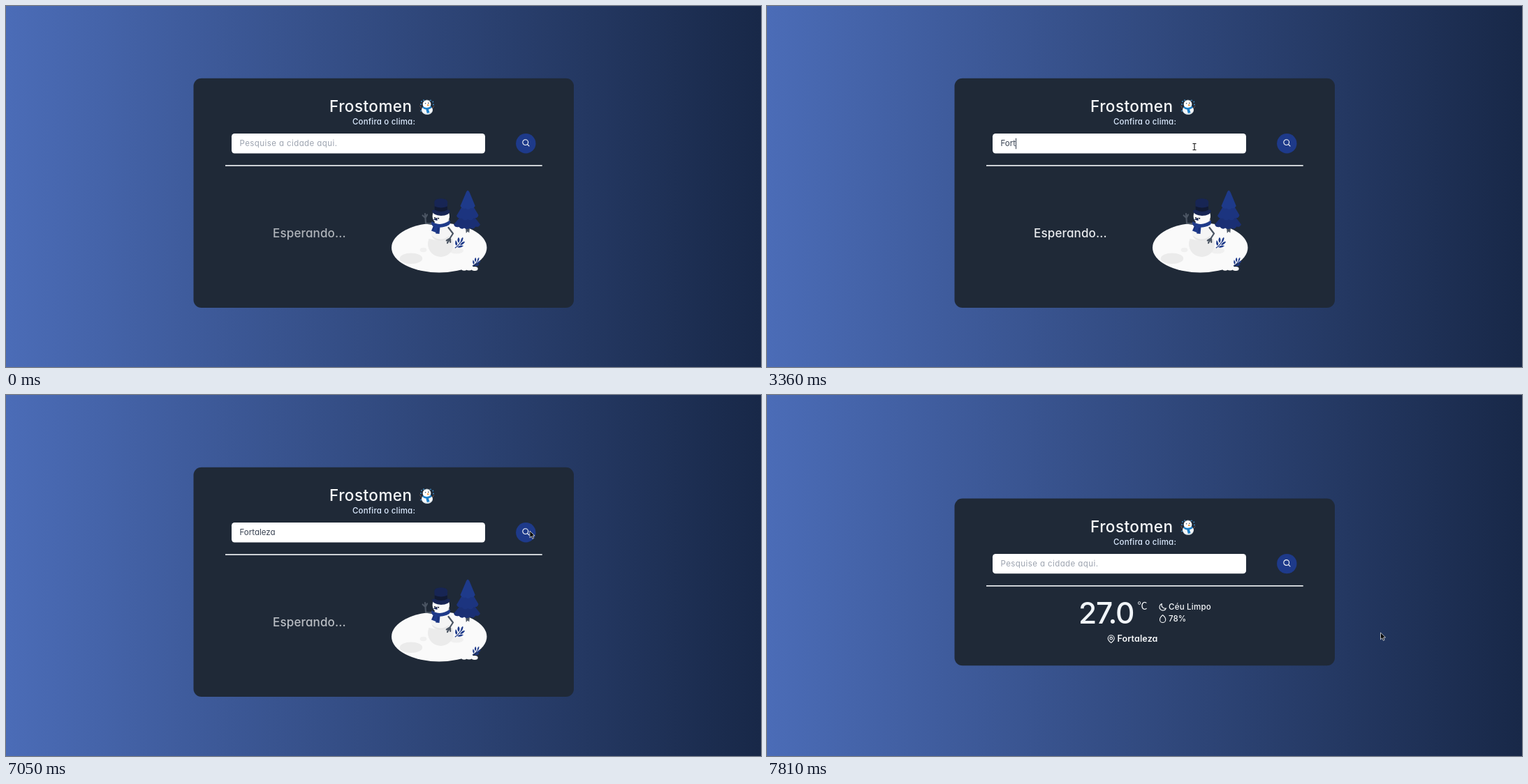
An HTML page for the animation above (8000 ms loop, 1081 by 518 pixels).

```html
<!DOCTYPE html>
<html lang="pt-BR">
<head>
<meta charset="utf-8">
<title>Clima</title>
<style>
  html, body { margin: 0; width: 100%; height: 100%; overflow: hidden; background: #31497f; }
  svg { display: block; width: 100vw; height: 100vh; }
  text { font: 500 11.5px Inter, "Open Sans", sans-serif; font-feature-settings: "cv11"; fill: #f8fafc; white-space: pre; }
  .title { font-size: 22.5px; letter-spacing: .02em; }
  .sub { letter-spacing: .016em; fill: #dbeafe; }
  .hint { font-weight: 400; letter-spacing: .036em; fill: #9ca3af; }
  .typed { font-weight: 400; fill: #374151; }
  .wait { font-size: 17px; letter-spacing: .008em; }
  .temp { font-size: 42.5px; letter-spacing: -.03em; fill: #f1f5f9; }
  .unit { font: 400 14px "Noto Sans CJK JP", "Noto Sans CJK SC", sans-serif; }
  .sky { letter-spacing: .02em; }
  .city { font-size: 12.5px; font-weight: 600; letter-spacing: .01em; }
  .line { fill: none; stroke: #f8fafc; stroke-width: 1.1; stroke-linecap: round; stroke-linejoin: round; }
  .twig { fill: none; stroke: #4b5563; stroke-width: 2.2; stroke-linecap: round; stroke-linejoin: round; }
</style>
</head>
<body>
<svg viewBox="0 0 1081 518" preserveAspectRatio="none">
  <defs>
    <linearGradient id="night"><stop stop-color="#4b6cb7"/><stop offset="1" stop-color="#182848"/></linearGradient>
    <g id="sprig" fill="#1e3a8a">
      <path d="M-6 7Q0 4 5-7" fill="none" stroke="#1e3a8a" stroke-width="1.2"/>
      <path d="M5-8Q1-5 3-1Q6-4 5-8ZM-1-8Q-4-4-1 0Q2-4-1-8ZM-5-4Q-7 1-4 4Q-1 1-5-4ZM8-2Q3-2 1 3Q6 3 8-2ZM6 4Q1 2-3 6Q2 8 6 4Z"/>
    </g>
  </defs>
  <rect width="1081" height="518" fill="url(#night)"/>
  <rect id="card" x="268.5" width="544.5" rx="11.3" fill="#1f2937"/>

  <g id="head">
    <text class="title" x="463" y="152">Frostomen</text>
    <g id="emoji">
      <path d="M595 147L592.5 143M610.5 147L613 143.5" stroke="#7c5446" stroke-width="1" fill="none"/>
      <ellipse cx="603" cy="149.2" rx="8" ry="6.4" fill="#f5f7f9"/>
      <path d="M596 152Q603 157.5 610.5 151Q609 155.7 603 155.7Q597.5 155.7 596 152Z" fill="#cfd8dc"/>
      <circle cx="602.5" cy="141" r="5.9" fill="#fff"/>
      <path d="M597 144Q603 148 608.8 143.5L609.5 146Q607 148 605 148.4L606.5 153L602.8 154L601.4 148.5Q598 148 596.4 146Z" fill="#1c7fc7"/>
      <path d="M603 141.2L607 142L603.2 143.2Z" fill="#f57c00"/>
      <g fill="#37474f"><circle cx="600.6" cy="139.8" r=".8"/><circle cx="604.8" cy="139.4" r=".8"/></g>
      <path d="M598.5 136.5Q602.5 133.5 607 136.2" stroke="#b0bec5" stroke-width=".8" fill="none"/>
      <g id="flakes" fill="#3d8fc9"></g>
    </g>
    <text class="sub" x="541" y="170" text-anchor="middle">Confira o clima:</text>
    <rect x="323" y="183" width="363" height="28.4" rx="4.3" fill="#fff"/>
    <text id="hint" class="hint" x="334.5" y="201.2">Pesquise a cidade aqui.</text>
    <text id="typed" class="typed" x="334.5" y="201.2"></text>
    <rect id="caret" y="189.7" width="1" height="15.5" fill="#374151"/>
    <circle cx="744.3" cy="197.2" r="14.2" fill="#1e3a8a"/>
    <path class="line" d="M747.6 195.6a3.9 3.9 0 1 1-7.8 0a3.9 3.9 0 1 1 7.8 0M746.6 198.6L749 201"/>
    <rect x="314" y="228.2" width="453.7" height="1.6" fill="#f8fafc"/>
  </g>

  <g id="waiting">
    <text id="wait" class="wait" x="434.5" y="332" text-anchor="middle">Esperando...</text>
    <ellipse cx="620.2" cy="346.7" rx="68.2" ry="35.8" fill="#fafafa"/>
    <ellipse cx="580" cy="362.3" rx="16.2" ry="7.7" fill="#ebebeb"/>
    <ellipse cx="597.5" cy="350" rx="4.8" ry="3.2" fill="#f0f0f0"/>
    <path d="M657.8 316H664.2L663.2 325.5L661 323.5L658.8 326Z" fill="#4b5563"/>
    <path d="M661 290L679 313.5Q677 318 672.5 316.5Q669 321.5 664.5 318.5Q660 322 656 318.5Q652 321.5 648.5 317Q643 318.5 641 313.5Z" fill="#1a2f74"/>
    <path d="M661 274L676.5 300Q675 305.5 670 304Q666 309.5 661.5 306Q656.5 309.5 652.5 304.5Q647.5 306 645 301Z" fill="#1c347f"/>
    <path d="M661 264.5Q663 265 664 268L671.8 287Q669 291.5 665.5 290Q661.5 293.5 658 290.5Q653 291.5 650.5 287L658.5 268Q659.5 265 661 264.5Z" fill="#1e3a8a"/>
    <ellipse cx="645" cy="351" rx="10" ry="4.5" fill="#f0f0f0"/>
    <circle cx="622.5" cy="341.5" r="18.5" fill="#ebebeb"/>
    <path d="M604 333.5Q622 339 641 333L637 324H608Z" fill="#fafafa"/>
    <circle cx="622.5" cy="322.5" r="14.8" fill="#f5f5f5"/>
    <path d="M609 329Q622 340 636 329Q631 337.3 622.5 337.3Q613 337 609 329Z" fill="#e6e6e6"/>
    <circle cx="622.8" cy="301.5" r="12.2" fill="#fafafa"/>
    <path d="M613 310Q623 318 635 306Q634.5 313.5 623 314Z" fill="#e8e8e8"/>
    <path class="twig" d="M612 313.5L601 311.5L600 298M600.4 304L596.6 300.5M600.5 304L603 299.5"/>
    <path class="twig" d="M633.5 318L640 326.5L634.5 335M635.5 333.5L630.8 336.5M635 334.5L632 340M636 334L636.2 339"/>
    <path d="M609.5 309Q622 317.5 635.5 307.5Q637 311.5 634.5 314Q624 320 612 316.5Q608 313.5 609.5 309Z" fill="#1e3a8a"/>
    <path d="M612.5 314L619.5 316.5L615.5 325L609 322.5ZM616 316L621.5 317L620.5 327L615.2 326.6Z" fill="#1e3a8a"/>
    <path d="M613 316.5L610.8 322M618.8 318L617.8 326" stroke="#142663" stroke-width=".8"/>
    <path d="M617.5 303.5L611.5 306.5L617.5 308Z" fill="#172554"/>
    <g fill="#111827"><circle cx="614" cy="304" r="1"/><circle cx="619.2" cy="304.8" r="1"/></g>
    <path d="M613.3 281Q614 276.5 622.8 276.2Q631.5 276.5 632.2 281L631.7 297H614Z" fill="#172554"/>
    <path d="M613.7 287.5Q623 291.5 632 287.5L631.7 296H614Z" fill="#111a33"/>
    <path d="M609.8 293.5Q612.5 292 614 292.5Q623 297.5 632 292.5Q635 291.8 636 294Q634.5 301 622.8 301Q611.5 300.5 609.8 293.5Z" fill="#172554"/>
    <use href="#sprig" transform="translate(649 340) scale(1.02)"/>
    <g fill="#fafafa"><ellipse cx="656" cy="376.5" rx="4.2" ry="3.2"/><ellipse cx="663" cy="375" rx="6" ry="4.5"/><ellipse cx="671" cy="377" rx="4.7" ry="3"/></g>
    <use href="#sprig" transform="translate(673 367.5) scale(.83)"/>
  </g>

  <g id="bones" fill="#94a3b8">
    <rect x="297" y="303.3" width="241" height="45.3"/>
    <rect x="573.5" y="306.2" width="181" height="17"/>
    <rect x="573.5" y="328.8" width="181" height="17"/>
  </g>

  <g id="result">
    <text class="temp" x="446" y="328.3">27.0</text>
    <text class="unit" x="530.5" y="307">℃</text>
    <path class="line" d="M565.3 299.6A4.9 4.9 0 1 0 571.4 306A4.9 4.9 0 0 1 565.3 299.6Z"/>
    <text class="sky" x="575" y="308.4">Céu Limpo</text>
    <path class="line" d="M566.6 315.8Q570.7 319 570.7 322.4A4.1 4.1 0 0 1 562.5 322.4Q562.5 319 566.6 315.8Z"/>
    <text x="575" y="325.4">78%</text>
    <path class="line" d="M492.7 355.6Q488.2 352 488.2 349.2A4.5 4.5 0 0 1 497.2 349.2Q497.2 352 492.7 355.6ZM494.5 349.2a1.8 1.8 0 1 1-3.6 0a1.8 1.8 0 1 1 3.6 0"/>
    <text class="city" x="501.5" y="354.4">Fortaleza</text>
  </g>

  <g id="mouse">
    <path id="arrow" d="M0 0V9.8L2.3 7.7L3.9 11.3L5.6 10.5L4 7H7.1Z" fill="#000" stroke="#e5e7eb" stroke-width=".8"/>
    <path id="beam" d="M-2.5-4.5H-.6L0-4L.6-4.5H2.5M0-4V4M-2.5 4.5H-.6L0 4L.6 4.5H2.5" fill="none" stroke="#111" stroke-width="1.1"/>
  </g>
</svg>
<script>
const LOOP = 8000, LOADING = 7120, DONE = 7810, BLUR = 6700, FOCUS = 1000;
const CITY = "Fortaleza";
const keyTimes = [2200, 2680, 3000, 3300, 3480, 3900, 4250, 4600, 4900];
// time, x, y of the pointer tip
const track = [
  [70, 950, 466], [400, 800, 330], [750, 660, 225], [1100, 614, 203], [1450, 612, 202],
  [5050, 612, 202], [5400, 672, 204], [5640, 727, 203], [5840, 745, 199], [6310, 750, 195],
  [7260, 750, 195], [7400, 797, 234], [7560, 855, 305], [7740, 878.5, 341]
];
const el = id => document.getElementById(id);
const [card, head, hint, typed, caret, waiting, wait, bones, result, mouse, arrow, beam] =
  ["card", "head", "hint", "typed", "caret", "waiting", "wait", "bones", "result", "mouse", "arrow", "beam"].map(el);
const show = (node, on) => node.setAttribute("visibility", on ? "visible" : "hidden");

el("flakes").innerHTML = [[595, 137], [594, 141], [598, 135.2], [608, 135.4], [611.3, 137.5], [612, 141.5], [594, 150.5]]
  .map(([x, y]) => `<circle cx="${x}" cy="${y}" r=".9"/>`).join("");

// cubic-bezier(.4, 0, .6, 1)
function ease(x) {
  let lo = 0, hi = 1, s = .5;
  for (let i = 0; i < 18; i++) {
    s = (lo + hi) / 2;
    const bx = 1.2 * s * (1 - s) ** 2 + 1.8 * s * s * (1 - s) + s ** 3;
    if (bx < x) lo = s; else hi = s;
  }
  return s * s * (3 - 2 * s);
}

function pulse(phase) {
  const p = phase % 1;
  return 1 - .5 * ease(p < .5 ? 2 * p : 2 - 2 * p);
}

function pointer(t) {
  const i = track.findIndex(k => k[0] > t);
  if (i < 1) return track[i < 0 ? track.length - 1 : 0].slice(1);
  const [t0, x0, y0] = track[i - 1], [t1, x1, y1] = track[i];
  const u = (t - t0) / (t1 - t0);
  return [x0 + (x1 - x0) * u, y0 + (y1 - y0) * u];
}

function drawField(t) {
  const count = t < DONE ? keyTimes.filter(k => k <= t).length : 0;
  const text = CITY.slice(0, count);
  if (typed.textContent !== text) typed.textContent = text;
  show(hint, !count);
  const since = t - (count ? keyTimes[count - 1] : FOCUS);
  show(caret, t >= FOCUS && t < BLUR && since % 1000 < 500);
  caret.setAttribute("x", 334.5 + (count ? typed.getComputedTextLength() : 0));
}

function drawPointer(t) {
  const [x, y] = pointer(t);
  const overField = x > 323 && x < 686 && y > 183 && y < 211.4;
  mouse.setAttribute("transform", `translate(${x} ${y})`);
  show(arrow, t >= 70 && !overField);
  show(beam, t >= 70 && overField);
}

function draw(t) {
  const stage = t < LOADING ? 0 : t < DONE ? 1 : 2;
  const top = [103.7, 159.9, 148.6][stage];
  card.setAttribute("y", top);
  card.setAttribute("height", 536.8 - 2 * top);
  head.setAttribute("transform", `translate(0 ${[0, 56.2, 44.9][stage]})`);
  [waiting, bones, result].forEach((g, i) => show(g, i === stage));
  wait.setAttribute("opacity", pulse(t < 1600 ? .3 + .7 * t / 1600 : (t - 1600) / 2000));
  bones.setAttribute("opacity", pulse(Math.max(0, t - LOADING) / 2000));
  drawField(t);
  drawPointer(t);
}

const start = performance.now();
function tick() {
  draw((performance.now() - start) % LOOP);
  requestAnimationFrame(tick);
}
tick();
</script>
</body>
</html>
```
